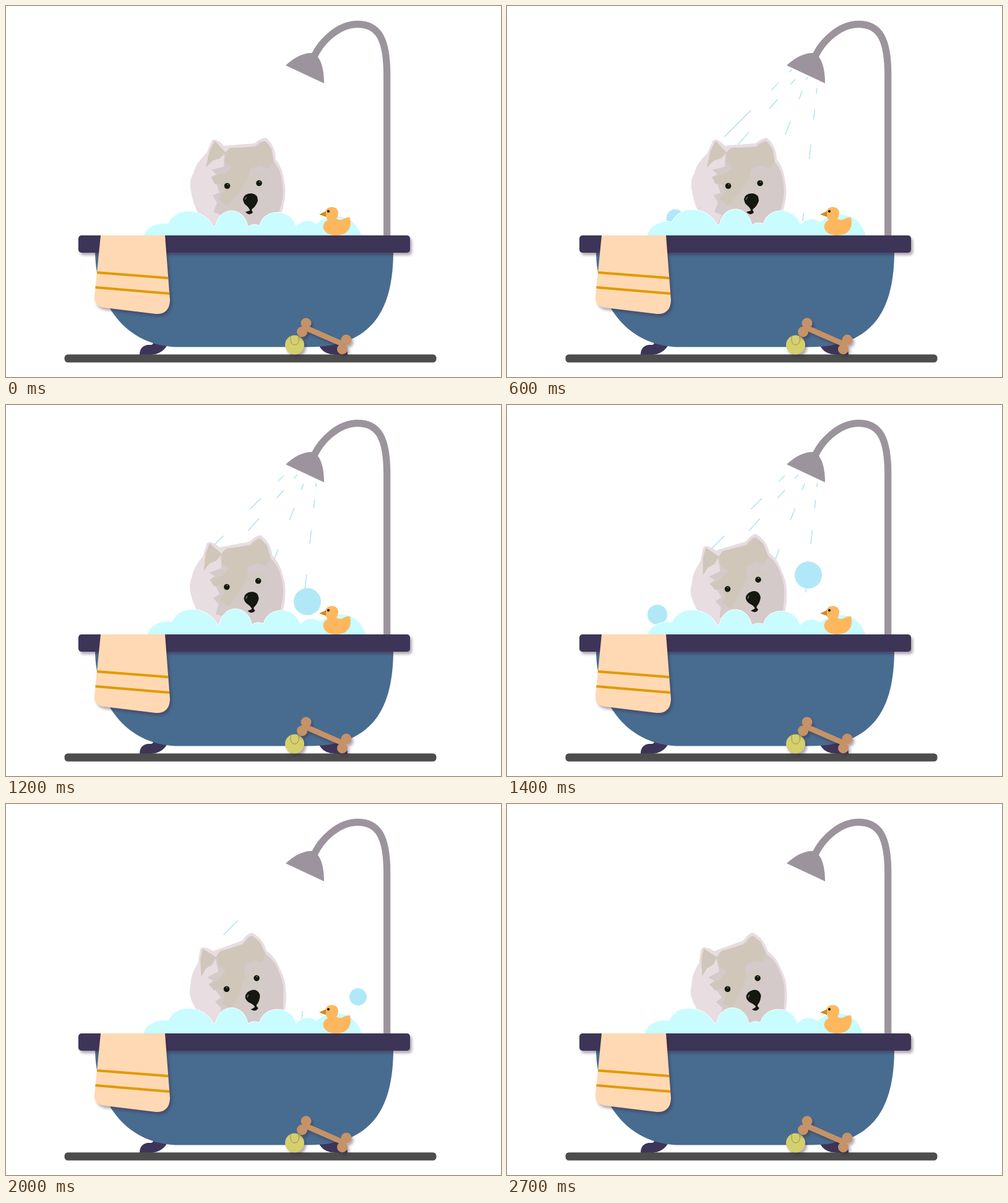
An HTML page for the animation above (2800 ms loop, 800x600 px).

```html
<!DOCTYPE html>
<html lang="en">
<head>
<meta charset="utf-8">
<title>Bath time</title>
<style>
  html, body { margin: 0; width: 100%; height: 100%; overflow: hidden; background: #fff; }
  svg { display: block; width: 800px; height: 600px; }
  .shadow { filter: drop-shadow(3px 4px 2px rgba(60, 35, 60, .4)); }
</style>
</head>
<body>
<svg viewBox="0 0 800 600">
  <defs>
    <g id="eye"><circle r="4.8" fill="#14180f"/><circle cx="1" cy="-2" r=".8" fill="#bbb"/></g>
    <circle id="knob" r="8.5"/>
  </defs>

  <!-- shower -->
  <path d="M615.700 372V112C615.700 53 602 29.500 568 29.500C537 29.500 508 58 497 84" fill="none" stroke="#9c949c" stroke-width="11.3"/>
  <path d="M452 96C468 81 484 75 495 76C508 80 514 100 514 125Z" fill="#9c949c"/>
  <path id="water" fill="none" stroke="#ace0ef" stroke-width="1.4"/>

  <g id="dog">
    <path fill="#e8dde1" d="M338 216L333 217Q328 228 324 238Q306 255 303 270Q295 283 299 300Q302 320 312 338L322 365H430Q446 340 449 320Q454 300 449 280Q447 262 436 248Q435 225 420 213Q411 214 402 222L352 226Q345 218 338 216Z"/>
    <path fill="#d5caca" d="M353 238L361 230L402 227Q412 218 419 218Q431 228 431 250Q444 264 446 282Q450 305 445 320Q440 340 430 362H337L347 338L335 333L341 318L334 306L345 302L340 288L331 277L340 272L332 265L352 260Z"/>
    <path fill="#d0c6ba" d="M356 236L364 229L403 229L418 219L429 231L433 252L424 264L411 258L396 262L392 275L396 286L379 300L374 316L356 322L344 312L352 300L348 288L337 288L332 276L352 272L364 262L354 252Z"/>
    <path fill="#d0c6ba" d="M337 218L355 237L345 247L334 250L323 261L329 234Z"/>
    <path fill="#d4cac4" d="M393 276L409 270L424 278L418 296L407 302L386 300L379 308L383 328L366 335L360 320L378 299Z"/>
    <g transform="translate(357.500 291)"><use class="eye" href="#eye"/></g>
    <g transform="translate(409 286.500)"><use class="eye" href="#eye"/></g>
    <path fill="#14180f" d="M383 312Q385 303 397 303Q407 304 407 315Q404 324 398 328L397 330L399 334Q393 340 387 333L394 331Q394 328 390 324Q383 319 383 312Z"/>
    <path d="M386 313L389 309" stroke="#aaa"/>
  </g>

  <g id="bubbles" fill="#b1e8f7"></g>
  <path id="foam" fill="#c8fcff" stroke="#fff" d="M222 382C218 359 246 348 262 352C270 335 285 331.500 297 332C315 333 330 344 335 357L339 355C345 323 385 323 391 357Q399 351 410 355C415 328 460 325 469 356Q485 340 502 352C520 335 560 331 575 371V382Z"/>

  <!-- duck -->
  <path fill="#ffb75e" d="M516 333Q518 325 527 325Q537 326 537 335Q537 340 534 344Q540 348 546 344Q552 341 556 342Q559 355 553 363Q547 371 533 371Q518 371 513 360Q511 351 520 346Q515 340 516 333Z"/>
  <path fill="#d18a1d" d="M517 332L506 337L517 341Z"/>
  <circle cx="521" cy="332" r="2"/>

  <!-- tub -->
  <g fill="#3d3558">
    <path d="M238 540Q239 548 234 548H229Q216 550 216 564H236Q256 562 263 543Z"/>
    <path d="M504 545Q510 563 532 564H552Q552 549 535 545Z"/>
  </g>
  <rect x="94.500" y="563.500" width="601" height="13" rx="5.500" fill="#4d4d4d"/>
  <path fill="#486c90" d="M144 395C144 484 196 551.500 280 551.500H490C595 551 626 488 626 395Z"/>
  <rect class="shadow" x="117" y="371" width="536" height="28" rx="5" fill="#3d3558"/>
  <g class="shadow">
    <path fill="#ffd9b3" d="M153 371H257L265 476Q264 499 242 498L160 488Q142 486 143 470Z"/>
    <path d="M147 431L262 440M144.500 455L264 465" stroke="#e09a00" stroke-width="4"/>
  </g>

  <!-- toys -->
  <g class="shadow">
    <circle cx="466.500" cy="548" r="15.500" fill="#d5d06d"/>
    <path d="M460 533V541Q461 549 468 548Q475 546 473 534" fill="none" stroke="#98905a"/>
  </g>
  <g class="shadow" fill="#c69268">
    <use href="#knob" x="485" y="513"/><use href="#knob" x="478.500" y="527"/>
    <use href="#knob" x="550" y="540"/><use href="#knob" x="543.500" y="555"/>
    <path d="M483 520L546 547.500" stroke="#c69268" stroke-width="9"/>
  </g>
</svg>
<script>
const LOOP = 2800, STEP = 100;
const $ = id => document.getElementById(id);

// x, y: first drop; lean: dx per dy; pace: growth of the gaps; phase: slot shift; end: lowest y
const jets = [
  { x: 460, y: 103, lean: -1, pace: 1.15, phase: 1, end: 236 },
  { x: 474, y: 109, lean: -.874, pace: 1, phase: 0, end: 224 },
  { x: 485.7, y: 115, lean: -.387, pace: 1.25, phase: 1, end: 254 },
  { x: 502, y: 122, lean: -.107, pace: 1.08, phase: 0, end: 348 }
];

const bubbles = [
  { x: 272, start: 483, rise: .4175, r: 14.5 },
  { x: 487, start: 856, rise: .215, r: 22 },
  { x: 243, start: 1223, rise: .3, r: 16 },
  { x: 569, start: 1733, rise: .3, r: 14 }
];
const BUBBLE_LIFE = 650, BUBBLE_FLOOR = 392;

// Falling drops speed up, so each slot is longer than the one above it.
const slotTop = (jet, k) => Math.min(jet.end, jet.y + jet.pace * (2.6 * k + 1.15 * k * k));

function dash(jet, k) {
  const point = y => `${jet.x + jet.lean * (y - jet.y)} ${y}`;
  return `M${point(slotTop(jet, k))}L${point(slotTop(jet, k + 1))}`;
}

function waterPath(t) {
  const tick = Math.floor(t / 300), first = 2, last = 6;
  if (tick < 1 || tick > last) return '';
  // Two outer drops linger as the spray starts and stops.
  let d = tick === first || tick === last ? dash(jets[0], 7) + dash(jets[3], 12) : '';
  if (tick === last) return d;
  for (const jet of jets)
    for (let k = (tick + jet.phase) % 3; k <= 4 * tick && slotTop(jet, k) < jet.end; k += 3)
      d += dash(jet, k);
  return d;
}

function foamOffset(t) {
  const time = Math.min(t, 2000);
  const swing = (size, half) => size * (1 - Math.cos(Math.PI * time / half));
  return [swing(3.5, 1000), swing(-1.6, 800)];
}

const smooth = p => p * p * (3 - 2 * p);

function draw(t) {
  const tilt = -15 * smooth(Math.min(1, Math.max(0, (t - 900) / 700)));
  $('dog').setAttribute('transform', `rotate(${tilt} 388.4 299)`);

  const open = t >= 1500 && t < 1700 ? .6 : 1;
  for (const eye of document.querySelectorAll('.eye'))
    eye.setAttribute('transform', `scale(${open})`);

  $('water').setAttribute('d', waterPath(t));
  $('foam').setAttribute('transform', `translate(${foamOffset(t)})`);
  $('bubbles').innerHTML = bubbles
    .filter(b => t >= b.start && t < b.start + BUBBLE_LIFE)
    .map(b => `<circle cx="${b.x}" cy="${BUBBLE_FLOOR - b.rise * (t - b.start)}" r="${b.r}"/>`)
    .join('');
}

const begin = performance.now();
function frame() {
  const t = (performance.now() - begin) % LOOP;
  draw(Math.floor(t / STEP) * STEP);
  requestAnimationFrame(frame);
}
frame();
</script>
</body>
</html>
```
